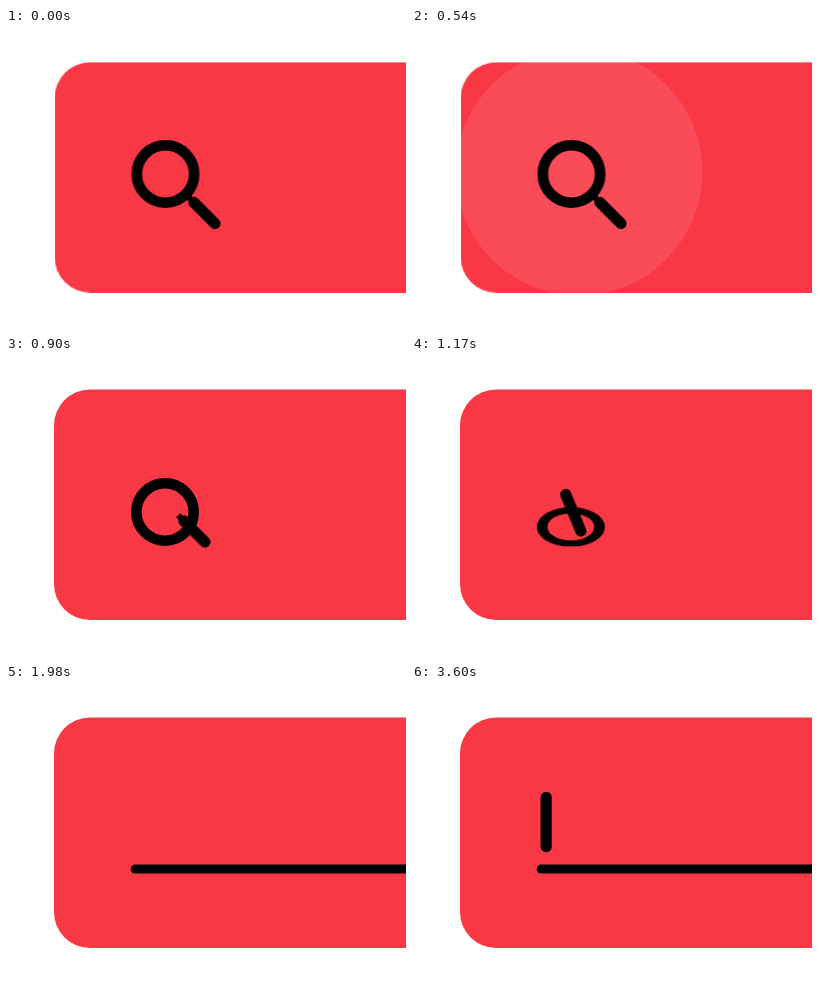
These frames come from a looping animation (400 px wide and 300 px high, 3780 ms). An HTML page without scripts:

```html
<!DOCTYPE html>
<html lang="en">
<head>
<meta charset="utf-8">
<title>Search field</title>
<style>
  html, body { margin: 0; width: 100%; height: 100%; overflow: hidden; background: #fff; }
  svg { display: block; width: 100%; height: 100%; }

  .card, .ripple, .ring, .bar, .handle, .stick, .neck {
    animation: 3780ms step-end infinite;
  }
  .card { fill: #f93846; animation-name: nudge; }
  .ripple { fill: #fff; animation-name: ripple; }
  .ring { animation-name: squash; }
  .bar { animation-name: extend; }
  .handle { animation-name: travel, blink; }
  .stick { animation-name: grow; }
  .neck { animation-name: tuck; }

  @keyframes nudge {
    0% { transform: translate(.5px, .7px); }
    23.8%, 100% { transform: none; }
  }

  /* tap feedback: grows while fading */
  @keyframes ripple {
    0% { r: 25px; opacity: 0; }
    9.52% { r: 25px; opacity: .2; animation-timing-function: steps(4); }
    19.04%, 100% { r: 222px; opacity: 0; }
  }

  /* the ring drops to the baseline and flattens on it */
  @keyframes squash {
    0% { transform: translate(159.5px, 180px) scale(1, 1); opacity: 1; }
    23.8% {
      transform: translate(159px, 190px) scale(1, 1);
      opacity: 1;
      animation-timing-function: steps(6);
    }
    38.09% { transform: translate(158.7px, 191.3px) scale(1, .16); opacity: 1; }
    40.47%, 100% { transform: translate(158.7px, 191.3px) scale(1, .16); opacity: 0; }
  }

  @keyframes extend {
    0% { width: 68px; opacity: 0; }
    40.47% { width: 68px; opacity: 1; animation-timing-function: steps(4); }
    49.99%, 100% { width: 300px; opacity: 1; }
  }

  /* the handle swings upright and becomes the caret */
  @keyframes travel {
    0% { transform: translate(198.5px, 185px) rotate(-45deg); }
    23.8% {
      transform: translate(188.5px, 175.5px) rotate(-45deg);
      animation-timing-function: steps(6);
    }
    38.09%, 100% { transform: translate(134.2px, 138px) rotate(0deg); }
  }
  @keyframes grow {
    0% { y: -20.5px; height: 41px; }
    23.8% { y: -20.5px; height: 41px; animation-timing-function: steps(6); }
    38.09%, 100% { y: -30.2px; height: 60.4px; }
  }
  @keyframes tuck {
    0% { opacity: 1; }
    26.18%, 100% { opacity: 0; }
  }
  @keyframes blink {
    0%, 64.28%, 80.95%, 95.23%, 100% { opacity: 1; }
    52.38%, 69.04%, 85.71% { opacity: 0; }
  }
</style>
</head>
<body>
<svg viewBox="0 0 400 300" preserveAspectRatio="none">
  <clipPath id="field">
    <rect x="48.5" y="34.2" width="420" height="230.5" rx="36"/>
  </clipPath>
  <rect class="card" x="48" y="33.5" width="420" height="230.5" rx="36"/>
  <g clip-path="url(#field)">
    <circle class="ripple" cx="167" cy="144" r="25"/>
  </g>
  <g class="ring">
    <circle cy="-34" r="28.7" fill="none" stroke="#000" stroke-width="10.6"/>
  </g>
  <rect class="bar" x="124.7" y="180.6" width="68" height="9" rx="4.5"/>
  <g class="handle">
    <path class="neck" d="M0-23V-15" stroke="#000" stroke-width="6"/>
    <rect class="stick" x="-5.6" y="-20.5" width="11.2" height="41" rx="5.6"/>
  </g>
</svg>
</body>
</html>
```
